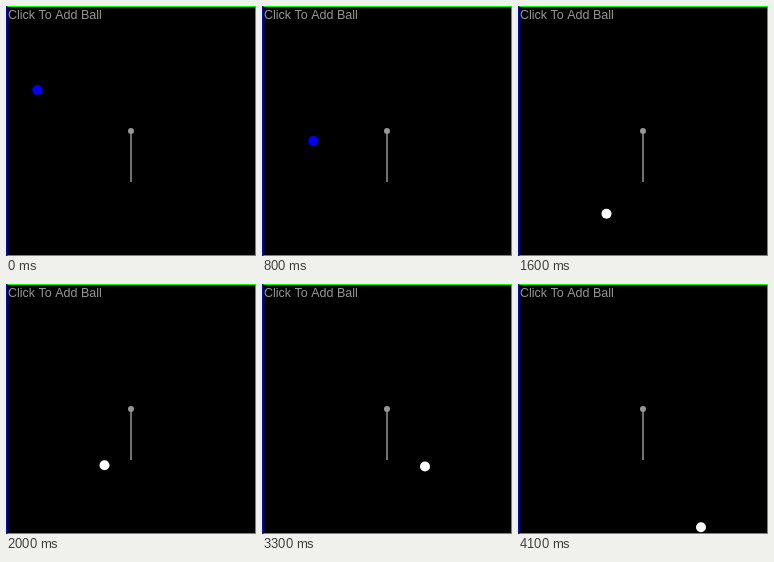
Animation of 250x250 px, one loop 4200 ms. Source, as an HTML page with a canvas:

```html
<!DOCTYPE html>
<html lang="en">
<head>
<meta charset="utf-8">
<title>Bouncing ball</title>
<style>
  html, body { margin: 0; width: 100%; height: 100%; overflow: hidden; background: #000; }
  canvas { display: block; }
</style>
</head>
<body>
<canvas id="stage" width="250" height="250"></canvas>
<script>
const ctx = document.getElementById("stage").getContext("2d");
const STEP_MS = 100, STEPS = 42;
const SPEED = 2.5, HALF_GRAVITY = 0.22;
const GREY = "#969696";

// Each flight: first step, x at step 0, apex step, apex height, colour.
const flights = [
  { from: 0, x0: 31.5, apex: -10.48, top: 59.85, color: "#00f" },
  { from: 13, x0: 48.5, apex: 33.1, top: 143.5, color: "#fff" },
  { from: 22, x0: 66, apex: 26, top: 143.5, color: "#fff" },
  { from: 31, x0: 80.5, apex: 19.7, top: 143.5, color: "#fff" }
];

function rect(color, x, y, w, h) {
  ctx.fillStyle = color;
  ctx.fillRect(x, y, w, h);
}

function disc(color, x, y, r) {
  ctx.fillStyle = color;
  ctx.beginPath();
  ctx.arc(x, y, r, 0, Math.PI * 2);
  ctx.fill();
}

function drawScene() {
  rect("#000", 0, 0, 250, 250);
  rect("#808080", 249, 0, 1, 250);
  rect("#808080", 0, 249, 250, 1);
  rect("#0f0", 0, 0, 250, 1);
  rect("#00f", 0, 0, 1.5, 250);

  ctx.fillStyle = GREY;
  ctx.font = "12.5px 'Liberation Sans', Arial, sans-serif";
  ctx.fillText("Click To Add Ball", 2, 12.5);

  rect(GREY, 124.25, 125, 1.5, 51);
  disc(GREY, 125, 125, 3);
}

function frame(now) {
  const step = Math.floor(now / STEP_MS) % STEPS;
  const flight = flights.findLast(f => step >= f.from);
  drawScene();
  disc(flight.color,
    flight.x0 + SPEED * step,
    flight.top + HALF_GRAVITY * (step - flight.apex) ** 2, 5);
  requestAnimationFrame(frame);
}
requestAnimationFrame(frame);
</script>
</body>
</html>
```
